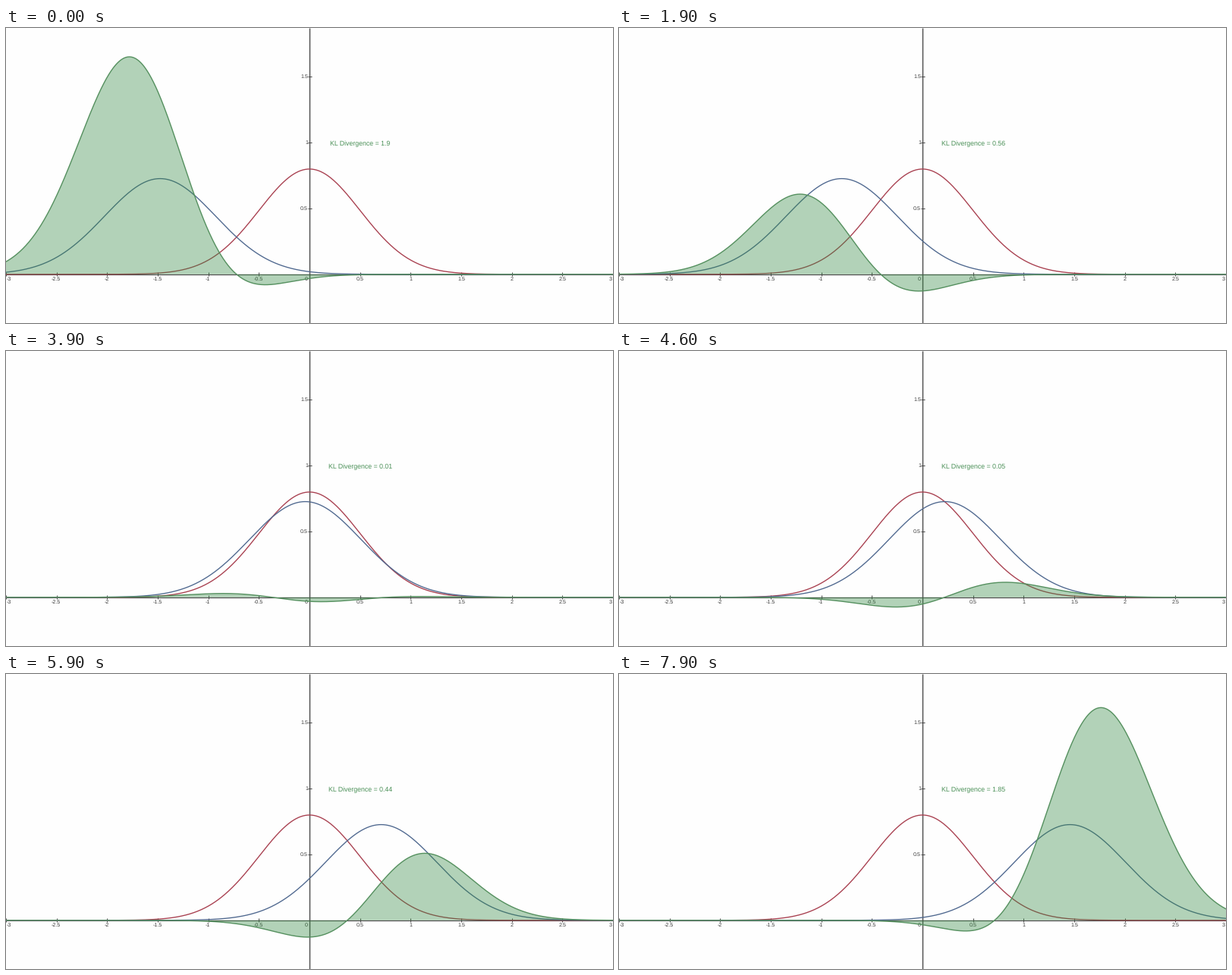
These frames come from a looping animation (800 px wide and 389 px high, 8000 ms). A matplotlib script:

```python
import numpy as np
import matplotlib.pyplot as plt
from matplotlib.animation import FuncAnimation

W, H, DPI = 800, 389, 100
FRAMES, STEP = 80, 100
X0, Y0 = 400, 324.8          # plot origin in pixels
SX, SY = 133.33, 174         # pixels per unit
SIGMA_P, SIGMA_Q = 0.5, 0.55

RED, BLUE, GREEN = "#a83f4f", "#4f688f", "#388c46"
LINE_GREEN, AXIS, INK = "#55905f", "#4a4a4a", "#3c3c3c"

plt.rcParams["font.family"] = "Liberation Sans"
plt.rcParams["text.hinting"] = "none"


def px(size):
    return size * 72 / DPI


def to_x(x):
    return X0 + SX * x


def to_y(y):
    return Y0 - SY * y


def log_normal(x, mu, sigma):
    return -0.5 * ((x - mu) / sigma) ** 2 - np.log(sigma * np.sqrt(2 * np.pi))


def mean_at(t):
    """Slider value: a short turn at the left end, then a steady sweep."""
    return np.interp(t, [0, 0.1, 3.1, 7.9], [-1.477, -1.483, -0.342, 1.458])


def divergence(mu):
    nats = (np.log(SIGMA_P / SIGMA_Q)
            + (SIGMA_Q ** 2 + mu ** 2) / (2 * SIGMA_P ** 2) - 0.5)
    return nats / np.log(10)


fig = plt.figure(figsize=(W / DPI, H / DPI), dpi=DPI, facecolor="#fefefe")
ax = fig.add_axes([0, 0, 1, 1])
ax.set_xlim(0, W)
ax.set_ylim(H, 0)
ax.axis("off")


def line(xs, ys, color, width, z):
    return ax.plot(xs, ys, color=color, lw=px(width), zorder=z,
                   solid_capstyle="butt")[0]


def text(x, y, s, size=7.2, color=INK, ha="center"):
    return ax.text(x, y, s, fontsize=px(size), color=color, ha=ha,
                   va="center_baseline", zorder=2)


# Axes, ticks and numbers
line([X0, X0], [0, H], AXIS, 1.4, 1)
line([0, W], [Y0, Y0], AXIS, 1.2, 1)
for v in np.arange(-3, 3.5, 0.5):
    x = to_x(v)
    if v:
        line([x, x], [Y0 - 2.5, Y0 + 2.5], AXIS, 1, 1)
    if abs(v) == 3:
        edge = 1 if v < 0 else W - 1.5
        text(edge, 330.8, f"{v:g}", ha="left" if v < 0 else "right")
    else:
        shift = -4 if v == 0 else (-0.5 if v < 0 else 0)
        text(x + shift, 330.8, f"{v:g}")
for v in (0.5, 1, 1.5):
    y = to_y(v)
    line([X0 - 2.5, X0 + 2.5], [y, y], AXIS, 1, 1)
    text(X0 - 2, y, f"{v:g}", ha="right")

# Curves
xs = np.linspace(-3.02, 3.02, 806)
sx = to_x(xs)
log_p = log_normal(xs, 0, SIGMA_P)
line(sx, to_y(np.exp(log_p)), RED, 1.35, 3)
q_line = line(sx, sx, BLUE, 1.35, 4)
area = ax.fill([0, 1, 1], [0, 0, 1], color=GREEN, alpha=0.38, lw=0, zorder=5)[0]
kl_line = line(sx, sx, LINE_GREEN, 1.4, 6)
label = text(467, 151.6, "", 8.75, "#4a9057")


def update(i):
    mu = mean_at(i * STEP / 1000)
    log_q = log_normal(xs, mu, SIGMA_Q)
    q = np.exp(log_q)
    ys = to_y(q * (log_q - log_p) / np.log(10))
    q_line.set_ydata(to_y(q))
    kl_line.set_ydata(ys)
    area.set_xy(np.column_stack([np.r_[sx[0], sx, sx[-1]],
                                 np.r_[Y0, ys, Y0]]))
    label.set_text(f"KL Divergence = {round(divergence(mu), 2):g}")
    return q_line, kl_line, area, label


anim = FuncAnimation(fig, update, frames=FRAMES, interval=STEP,
                     repeat=True, repeat_delay=0)
plt.show()
```
